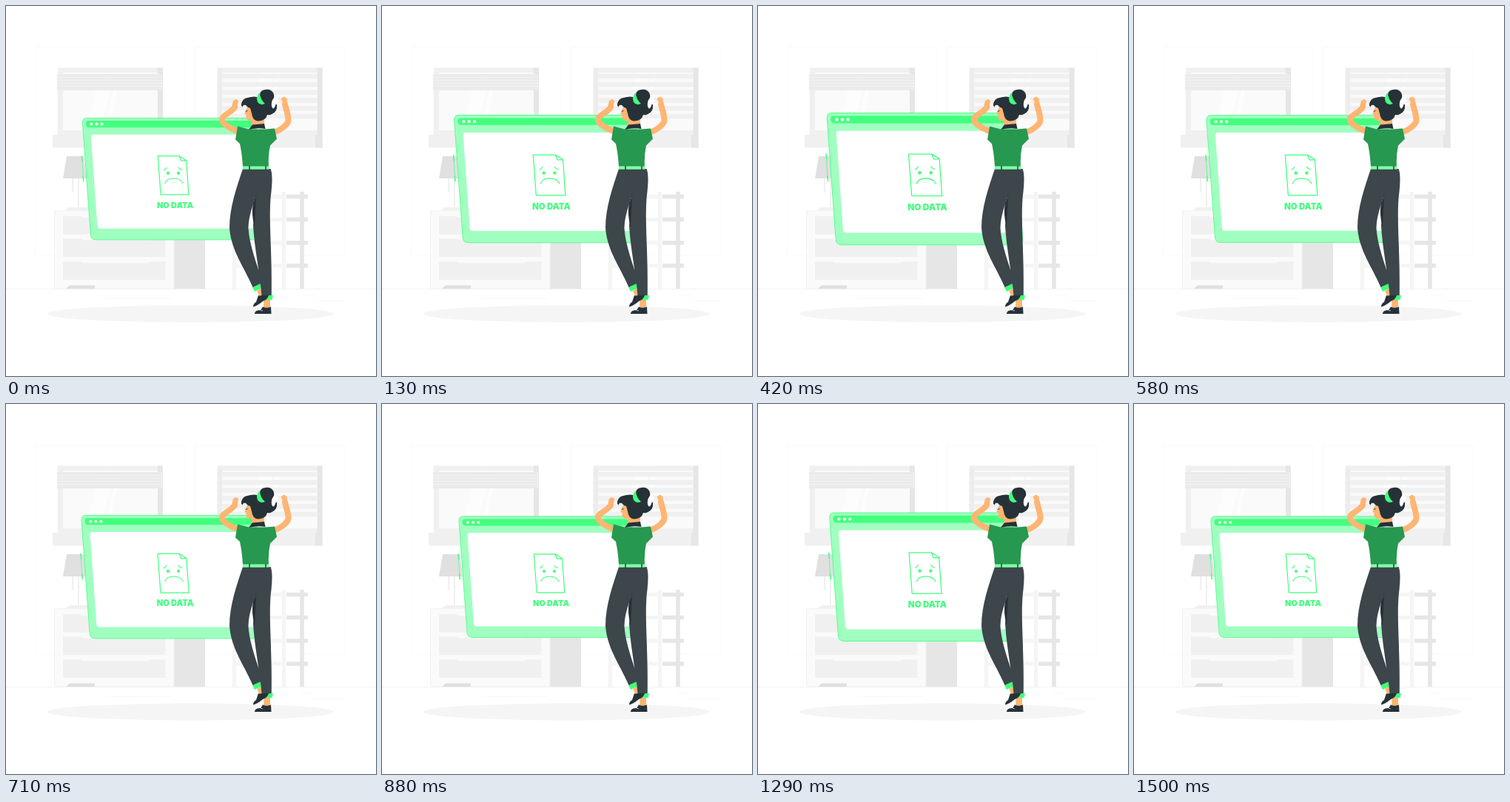
Recreate the animation shown at these times as an HTML page. Size 500 px wide and 500 px high, loop 1.54 s.

```html
<!DOCTYPE html>
<html lang="en">
<head>
<meta charset="utf-8">
<title>No data</title>
<style>
  html, body { margin: 0; width: 100%; height: 100%; overflow: hidden; background: #fff; }
  svg { display: block; width: 100%; height: 100%; }
  text { font: 900 10.9px Inter, sans-serif; }
  .line { fill: none; stroke: #43ff7e; stroke-linecap: round; stroke-linejoin: round; }
  .arm { fill: none; stroke: #ffb573; stroke-width: 8; stroke-linecap: round; stroke-linejoin: round; }
</style>
</head>
<body>
<svg viewBox="0 0 500 500">
  <defs>
    <path id="drawer" fill="#f0f0f0" d="M77 284H101L104 286H192L195 284H215.500V308.500H77Z"/>
    <g id="window">
      <path fill="#f0f0f0" d="M70 83.500H212V176H70Z"/>
      <path fill="#e6e6e6" d="M205 83.500H212V191.500H205Z"/>
      <path fill="#fafafa" d="M77 90H205V168H77Z"/>
      <path fill="#fff" d="M128 90H145L128 168H108ZM151 90H156L139 168H134Z" opacity=".7"/>
      <path fill="#f0f0f0" d="M63 174H212V191.500H63Z"/>
    </g>
  </defs>

  <g id="room">
    <path fill="none" stroke="#fafafa" d="M39.500 55.500H242.500V337.500H39.500ZM255.500 55.500H458.500V337.500H255.500Z"/>
    <path stroke="#f2f2f2" d="M0 382.500H500"/>
    <path stroke="#f8f8f8" d="M135 395.500H225M417 398.500H458M400 390.500H416"/>
    <use href="#window"/>
    <path fill="#ebebeb" d="M69 92H211V114H69Z"/>
    <path stroke="#f2f2f2" d="M69 96.500H211M69 100.500H211M69 104.500H211M69 108.500H211"/>
    <use href="#window" x="215.500"/>
    <path stroke="#f0f0f0" stroke-width="6.500" d="M285 95H421M285 106H421M285 116.800H421M285 127.500H421M285 138.300H421M285 149H421"/>
    <path stroke="#ececec" stroke-width="5" d="M289 84V160"/>
    <path fill="#e6e6e6" d="M418 174H427.500V191.500H418Z"/>

    <path fill="#e0e0e0" d="M82 203H105L109 233H77Z"/>
    <path stroke="#f0f0f0" stroke-width="2" d="M90 233V252M98 233V273"/>
    <path fill="#f0f0f0" d="M82 276Q83 272 88 272H112V276Z"/>

    <path fill="#e6e6e6" d="M227 276H269V382H227Z"/>
    <path fill="#fafafa" stroke="#f3f3f3" d="M65.500 276.500H227V382H65.500Z"/>
    <use href="#drawer"/><use href="#drawer" y="30.500"/><use href="#drawer" y="61.500"/>
    <path fill="#e0e0e0" d="M81 382L86 377.500H120V382Z"/>

    <path stroke="#f5f5f5" stroke-width="5" d="M308.500 251V382M375.500 251V382M306 257.500H378M306 288.500H378M306 320H378M306 351H378"/>
    <path stroke="#e6e6e6" stroke-width="5.500" d="M400 251V382M379 257.500H408M379 288.500H408M379 320H408M379 351H408"/>
    <ellipse cx="249.500" cy="416" rx="193.500" ry="11.500" fill="#f5f5f5"/>
  </g>

  <g id="screen">
    <path class="line" stroke-width="1.300" d="M103 203L103.700 210M104.600 230L105.300 236.500"/>
    <path class="line" stroke-width=".7" d="M103 203L105.300 236.500"/>
    <path fill="#a0ffc0" stroke="#43ff7e" stroke-width=".8" d="M109.500 151.800H330Q336 151.800 336.500 158L347 309Q347 315.500 341 315.500H122.500Q115.500 315.500 115 309L104 158Q104 151.800 109.500 151.800Z"/>
    <path fill="#43ff7e" d="M112 155.500H329Q333 155.500 333 160T329 164.500H113Q109 164.500 108.500 160T112 155.500Z"/>
    <g fill="#fff"><circle cx="116" cy="160" r="2"/><circle cx="123" cy="160" r="2"/><circle cx="130" cy="160" r="2"/></g>
    <path fill="#fff" d="M118.500 174H323Q326.500 174 327 178L335 297Q335 300.500 331.500 300.500H128Q124.500 300.500 124 297L115.500 178Q115.500 174 118.500 174Z"/>
    <g class="line" stroke-width="1.200">
      <path d="M205.300 202.800H234L243.500 208.800L246.800 254.800H209.200ZM234 202.800L236.500 209.200L243.500 208.800"/>
      <path d="M213.500 221.800Q216 221 217 218.500M233 218.500Q235 221 237.500 221.500M215 239.500Q217 233 226.500 233T239 239.500"/>
    </g>
    <g fill="#43ff7e">
      <circle cx="219" cy="226" r="2.100"/><circle cx="233" cy="226" r="2.100"/>
      <text x="228.600" y="272.800" text-anchor="middle">NO DATA</text>
    </g>
  </g>

  <g id="woman">
    <path fill="#ffb573" d="M326 137L323 143L322.500 146L324.500 147Q324 153 327 155L332 155V163H349V140Z"/>
    <path fill="none" stroke="#263238" d="M324 142.500L326.500 141.500"/>
    <path class="arm" d="M316 170C303 166 290 158 292 152C294 147 304 144 309 137"/>
    <path class="arm" d="M361 171C373 167 383 159 381.500 152C380.500 145 379 140 377 133"/>
    <path fill="#ffb573" d="M304.500 138L307 128L311 126L314 128L313 136L310 141ZM372.500 134L374 131L371.500 125L376 122.500L379.500 125L380.500 134Z"/>

    <path fill="#263238" d="M318 134Q319 125 326 124Q336 121 343 124Q342 115 348 113.500Q357 111 361 117Q364 122 360 130Q361 135 366 133Q367 142 359 146Q357 148 353 147Q351 155 341 155.500Q333 155 332 145L330 138Q326 137 324 134Q320 133 319.500 137Z"/>
    <path fill="#fff" d="M359.500 128Q357.500 136 361 139Q364.500 137 364 131L369 128L364 121Z"/>
    <path fill="#263238" d="M357 130Q358 141 363 138L365.500 132Q368 142 359 146L350 147Z"/>
    <path fill="#43ff7e" d="M343 117Q343 126 350 132Q344 135 340 130Q337 122 343 117Z"/>
    <path fill="none" stroke="#263238" d="M318.500 135Q318 129 323 126"/>

    <path fill="#27984f" d="M313 162.500L328 166.500H350L363 165.500L366 179.500L357 188.500Q354 203 355 217H320Q319 200 316 186L310 180.500Z"/>
    <path fill="#263238" d="M328 167L333 160.500L349 159L350.500 166Q340 164 328 167Z"/>
    <path fill="#ffb573" d="M339 385L346 381L349 389L343 393ZM348.500 396H357V409H348Z"/>
    <path fill="#43ff7e" d="M333 380L347 373.500L349 379.500L336 386ZM346 391H361L359.500 397H347Z"/>
    <path fill="#263238" d="M334 406.500Q334 402 338 400L341 391Q346 393 348 387L355 391Q354 396 347 399Q340 405 334 406.500ZM336 416Q336 411 344 411L347 406.500Q352 409 358 406.500L358.500 416Z"/>
    <path stroke="#fff" stroke-width=".7" d="M344 411L347 412"/>

    <path fill="#3c464b" d="M320 220H357.500Q361 228 358.500 251C354 285 360 330 358.800 391H345.500C343 360 336 330 334 297L337 258C334 270 328 282 327.500 300C329 325 340 350 346.500 374L333.500 380C322 353 304 330 302 300C302 272 312 244 320 220Z"/>
    <path fill="#263238" d="M338 256L336 299Q331 280 334 267Z"/>
    <path fill="#80ffa8" d="M320 216.500H355.500V220.800H320Z"/>
    <path stroke="#263238" stroke-width="1.400" d="M329 216V221.500M351 216V221.500"/>
  </g>
</svg>
<script>
  const LOOP = 1540, CX = 225.3, CY = 233.3;
  // [time in ms, swell from 0 to 1]
  const beats = [[-50, 0], [300, 1], [860, 0], [880, 0], [1175, 1], [1440, 0], [1490, 0], [1840, 1]];
  const screenGroup = document.getElementById('screen');
  const ease = u => (1 - Math.cos(Math.PI * u)) / 2;

  function swell(t) {
    const i = beats.findIndex(beat => beat[0] > t);
    const [t0, v0] = beats[i - 1], [t1, v1] = beats[i];
    return v0 + (v1 - v0) * ease((t - t0) / (t1 - t0));
  }

  function draw() {
    const scale = 1 + 0.1 * swell(performance.now() % LOOP);
    screenGroup.setAttribute('transform', `translate(${CX} ${CY}) scale(${scale}) translate(${-CX} ${-CY})`);
    requestAnimationFrame(draw);
  }
  draw();
</script>
</body>
</html>
```
